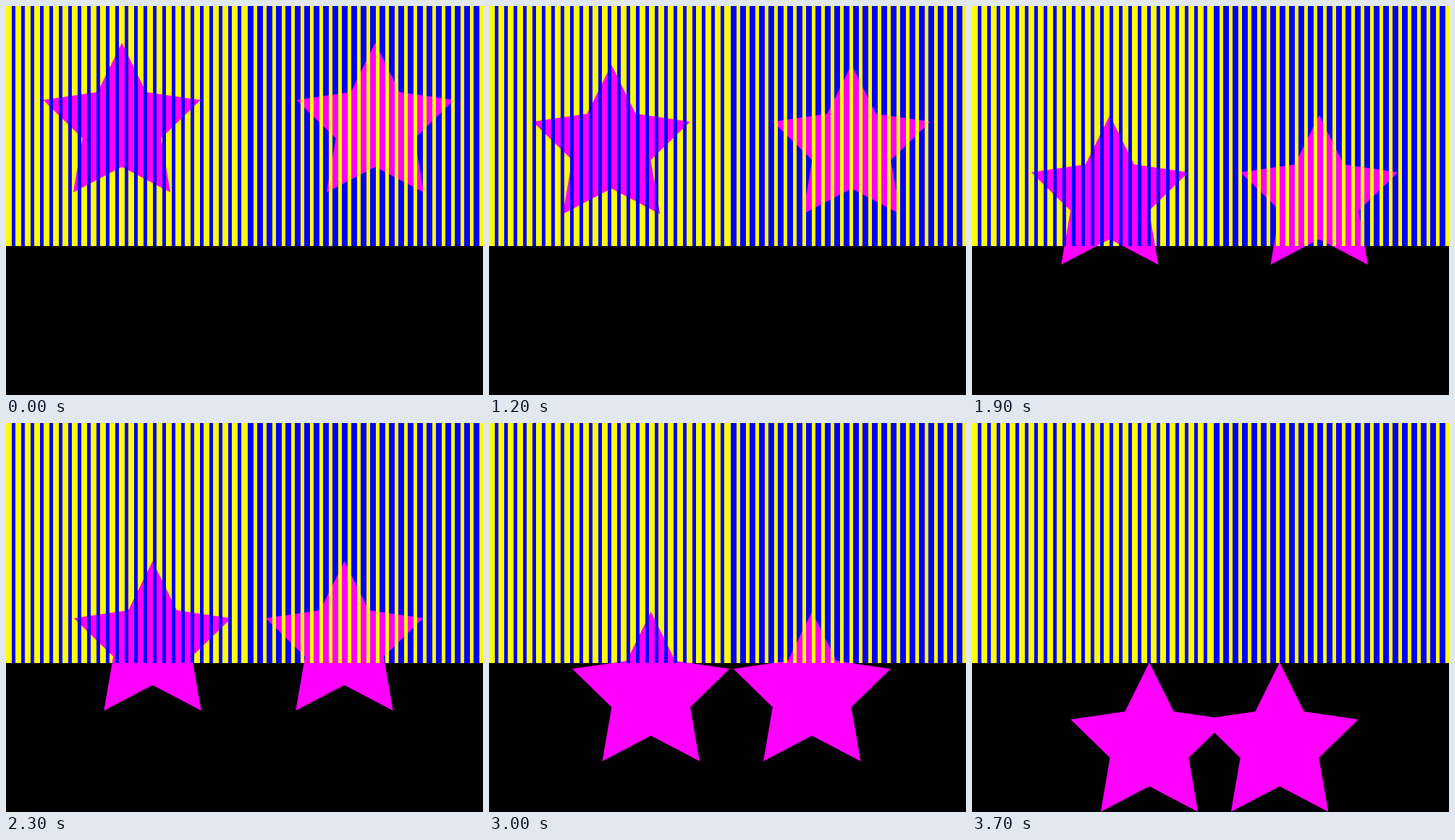
These frames come from a looping animation (659x538 px, 8700 ms). An HTML page:

```html
<!DOCTYPE html>
<html lang="en">
<head>
<meta charset="utf-8">
<title>Stars behind stripes</title>
<style>
html, body { margin: 0; width: 100%; height: 100%; overflow: hidden; background: #000; }
svg { display: block; width: 659px; height: 538px; }
</style>
</head>
<body>
<svg viewBox="0 0 659 538">
  <rect width="659" height="538" fill="#000"/>
  <rect width="334" height="332" fill="#ff0"/>
  <rect x="334" width="325" height="332" fill="#00f"/>
  <polygon id="left" fill="#f0f"/>
  <polygon id="right" fill="#f0f"/>
  <path id="blueBars" fill="#00f" shape-rendering="crispEdges"/>
  <path id="yellowBars" fill="#ff0" shape-rendering="crispEdges"/>
</svg>
<script>
const LOOP = 8700, HOLD = 1000, STEP = 100, STEPS = 28;
const RADIUS = 114.3;
const byId = id => document.getElementById(id);

// Five-pointed star around the origin
const starPoints = Array.from({ length: 10 }, (_, i) => {
  const r = i % 2 ? RADIUS / 2 : RADIUS;
  const a = i * Math.PI / 5;
  return `${(r * Math.sin(a)).toFixed(2)},${(-r * Math.cos(a)).toFixed(2)}`;
}).join(' ');

const bars = (x, count) =>
  Array.from({ length: count }, (_, i) => `M${x + 13 * i} 0h5v332h-5z`).join('');

const left = byId('left'), right = byId('right');
left.setAttribute('points', starPoints);
right.setAttribute('points', starPoints);
byId('blueBars').setAttribute('d', bars(8, 25));
byId('yellowBars').setAttribute('d', bars(342, 25));

function draw(ms) {
  const t = ms % LOOP;
  const step = t < HOLD ? 0 : Math.min(STEPS, Math.floor((t - HOLD) / STEP) + 1);
  const dx = 85 * step / STEPS;
  const y = 51 + RADIUS + 10 * step;
  left.setAttribute('transform', `translate(${160 + dx} ${y})`);
  right.setAttribute('transform', `translate(${510 - dx} ${y})`);
}

const start = performance.now();
function tick() {
  draw(performance.now() - start);
  requestAnimationFrame(tick);
}
tick();
</script>
</body>
</html>
```
